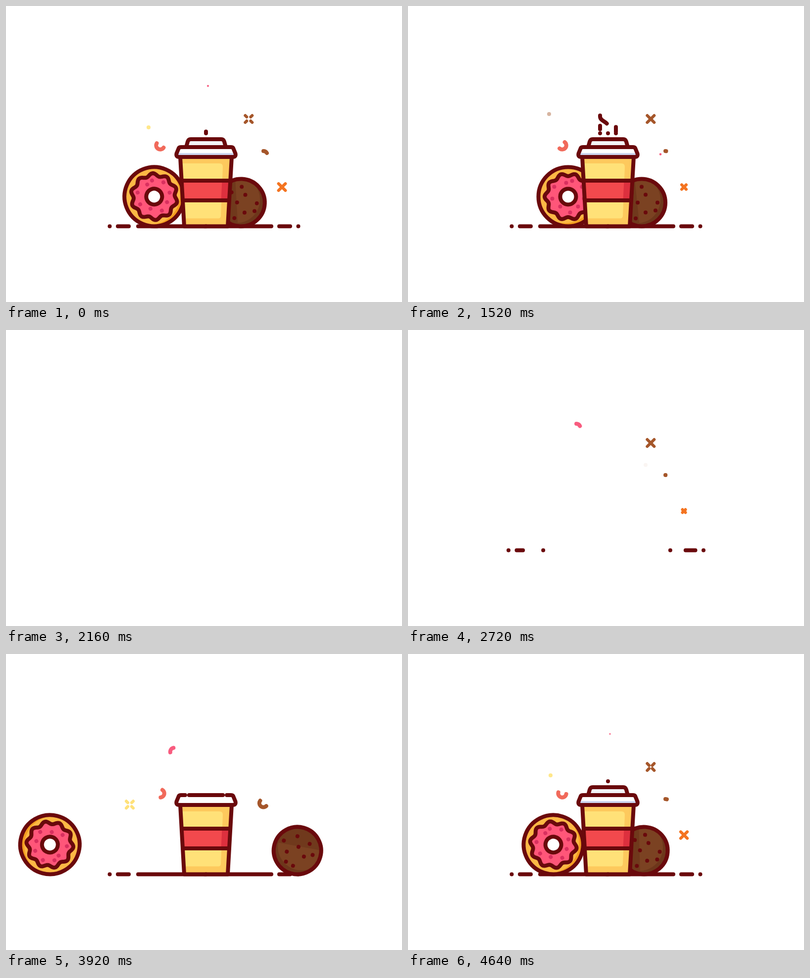
These frames come from a looping animation (800 px wide and 600 px high, 4.68 s). An HTML page with a canvas:

```html
<!DOCTYPE html>
<html lang="en">
<head>
<meta charset="utf-8">
<title>Coffee break</title>
<style>
html, body { margin: 0; width: 100%; height: 100%; overflow: hidden; background: #fff; }
canvas { display: block; width: 800px; height: 600px; }
</style>
</head>
<body>
<canvas id="stage" width="800" height="600"></canvas>
<script>
const LOOP = 4680, RESET = 2300, TAU = Math.PI * 2;
const INK = '#6a090c', BROWN = '#a5562a', CORAL = '#f16a5b', PINK = '#f85c7f',
      ORANGE = '#f47421', YELLOW = '#ffe17a';
const g = document.getElementById('stage').getContext('2d');

const clamp = v => Math.max(0, Math.min(1, v));
const ramp = (t, a, b) => clamp((t - a) / (b - a));
const out = (p, n = 2) => 1 - Math.pow(1 - p, n);
const mix = (a, b, p) => a + (b - a) * p;
const age = (t, start) => (t - start + LOOP) % LOOP;

function stroke(color = INK, width = 8) {
  g.strokeStyle = color;
  g.lineWidth = width;
  g.stroke();
}
function line(x1, y1, x2, y2, color, width) {
  g.beginPath();
  g.moveTo(x1, y1);
  g.lineTo(x2 + 0.01, y2);
  stroke(color, width);
}
function disc(x, y, r, color) {
  g.beginPath();
  g.arc(x, y, r, 0, TAU);
  g.fillStyle = color;
  g.fill();
}
function rect(x, y, w, h, color) {
  g.fillStyle = color;
  g.fillRect(x, y, w, h);
}
// Strokes the part of a path between two lengths.
function trim(path, from, to) {
  if (to < 0) return;
  g.setLineDash([0, from, Math.max(0.01, to - from), 999]);
  g.strokeStyle = INK;
  g.lineWidth = 8;
  g.stroke(path);
  g.setLineDash([]);
}
function clipped(path, draw) {
  g.save();
  g.clip(path);
  draw();
  g.restore();
}
function circlePath(r) {
  const p = new Path2D();
  p.arc(0, 0, r, 0, TAU);
  return p;
}

const donutRim = circlePath(60), cookieRim = circlePath(48);
const icing = new Path2D();
for (let i = 0; i < 180; i++) {
  const a = i / 180 * TAU, r = 44.5 + 3 * Math.cos(10 * a);
  icing.lineTo(r * Math.cos(a), r * Math.sin(a));
}
icing.closePath();

const sprinkles = [[8, -32], [-4, -28], [-28, -20], [-32, 4], [-16, 20], [4, 32], [20, 20], [32, 4], [28, -20]];
const chips = [[0, -32], [8, -16], [-8, 0], [32, 0], [28, 16], [8, 20], [-12, 32], [-20, -20], [-28, 8]];

function rolling(x, y, angle, draw) {
  g.save();
  g.translate(x, y);
  g.rotate(angle);
  draw();
  g.restore();
}

function donut(t) {
  const rest = 1.875e-4 * Math.max(0, 5040 - t) ** 2;
  if (rest > 460) return;
  rolling(323.5, 386.4, 0, () => {
    g.translate(-rest, 0);
    g.rotate(-rest / 64);
    clipped(donutRim, () => {
      disc(0, 0, 60, '#f49d20');
      disc(-6, -6, 60, '#fdb845');
    });
    g.stroke(donutRim);
    g.fillStyle = '#ff5679';
    g.fill(icing);
    for (const [x, y] of sprinkles) disc(x, y, 4, '#d9305f');
    g.stroke(icing);
    disc(0, 0, 16, '#fff');
    stroke();
  });
}

function cookie(t) {
  const rest = 1.444e-4 * Math.max(0, 4820 - t) ** 2;
  if (rest > 400) return;
  rolling(472 + rest, 398.5, rest / 63, () => {
    clipped(cookieRim, () => {
      disc(0, 0, 48, '#6d371b');
      disc(-10, -6, 48, '#7b4222');
      g.save();
      g.rotate(-0.1);
      rect(-60, -60, 51, 120, '#70391c');
      g.restore();
    });
    for (const [x, y] of chips) disc(x, y, 4, INK);
    g.stroke(cookieRim);
  });
}

function ground(t) {
  const p = ramp(t, 2620, 2980), shift = 6.5 * (1 - ramp(t, 2720, 2960));
  const early = 10 * (1 - ramp(t, 2560, 2720));
  if (t < 2560) return;
  const left = -shift - early;
  line(209.5 + left, 446.5, 209.5 + left, 446.5);
  const dash = 22 * ramp(t, 2560, 2840);
  line(226 + left, 446.5, 226 + left + dash, 446.5);
  if (t < 2640) return;
  const dashR = 22 * ramp(t, 2560, 2740);
  line(590.5 + shift, 446.5, 590.5 + shift, 446.5);
  line(574 + shift - dashR, 446.5, 574 + shift, 446.5);
  const reach = 134.5 * out(ramp(t, 2720, 3000));
  const inset = shift * 0.95;
  line(267 + inset, 446.5, Math.max(267 + inset, 267 + reach), 446.5);
  line(Math.min(536 - inset, 536 - reach), 446.5, 536 - inset, 446.5);
}

const body = new Path2D('M352 306H456L448 446H360Z');
const light = new Path2D('M340 319H431Q438 319 438 326L434 426Q433 430.500 429 430.500H340Z');
const wallL = new Path2D('M404 446.500H360L352 306');
const wallR = new Path2D('M404 446.500H448L456 306');
const lid = new Path2D('M354 286H454Q458 286 459 288L463.500 299Q465 306 458 306H350Q343 306 344.500 299L349 288Q350 286 354 286Z');
const lidL = new Path2D('M404 306H350Q343 306 344.500 299L349 288Q350 286 354 286H364');
const lidR = new Path2D('M404 306H458Q465 306 463.500 299L459 288Q458 286 454 286H444');
const cap = new Path2D('M364 286L367 275Q368.500 270 373 270H435Q439.500 270 441 275L444 286Z');

function cup(t) {
  const grow = out(ramp(t, 3020, 3420));
  if (grow <= 0) return;
  const top = mix(446, 306, grow);
  clipped(body, () => {
    g.beginPath();
    g.rect(340, top, 130, 150);
    g.clip();
    rect(340, 300, 130, 150, '#fdc95d');
    g.fillStyle = '#ffe178';
    g.fill(light);
    const band = ramp(t, 3260, 3480);
    if (band > 0) {
      const h = 40 * band;
      rect(340, 394 - h, 130, h, '#f2494d');
      g.beginPath();
      g.moveTo(436.5, 394 - h);
      g.lineTo(470, 394 - h);
      g.lineTo(470, 394);
      g.lineTo(434.5, 394);
      g.fillStyle = '#dd303e';
      g.fill();
    }
  });
  trim(wallL, 0, 184.3 * grow);
  trim(wallR, 0, 184.3 * grow);
  const bars = ramp(t, 3260, 3480);
  if (bars > 0) {
    line(355, 354, mix(355, 453, bars), 354);
    line(357, 394, mix(357, 451, bars), 394);
  }

  const rise = out(ramp(t, 3970, 4240));
  if (rise > 0) {
    g.save();
    g.beginPath();
    g.rect(350, 250, 110, 37);
    g.clip();
    g.translate(0, 16 * (1 - rise));
    g.fillStyle = '#f3f4f8';
    g.fill(cap);
    g.stroke(cap);
    g.restore();
  }

  const rim = ramp(t, 3440, 3935);
  if (rim <= 0) return;
  if (rim > 0.6) {
    g.fillStyle = '#fff';
    g.fill(lid);
    clipped(lid, () => rect(340, 298, 128 * ramp(t, 3940, 4160), 6, '#ccd5ef'));
  }
  const length = 91 * out(rim, 1.3);
  trim(lidL, 0, length);
  trim(lidR, 0, length);
  const half = 40 * ramp(t, 3640, 3970);
  if (half > 0) line(404 - half, 286, 404 + half, 286);
}

// path, length, delay, duration, tail power
const wisps = [
  [new Path2D('M388 258V241'), 17, 50, 1000, 1.8],
  [new Path2D('M404 258V244C404 234 388 234 388 224V211'), 51, 0, 1200, 1.8],
  [new Path2D('M420 258V242'), 16, 210, 920, 3],
  [new Path2D('M404 222V209'), 13, 760, 700, 1.8]
];
function steam(t) {
  for (const start of [4640, 5480, 6320]) {
    for (const [path, length, delay, time, power] of wisps) {
      const p = (t - start - delay) / time;
      if (p >= 0 && p <= 1) trim(path, length * p ** power, length * out(p));
    }
  }
}

// x, y, color, starts
const crosses = [
  [490.3, 229, BROWN, [1170, 2370, 4185]],
  [557.5, 367, ORANGE, [1380, 2636, 4374]],
  [250, 305.3, YELLOW, [430, 3430]]
];
function cross(x, y, color, p) {
  const far = 7 * out(clamp(p * 2)), near = Math.min(far, 7 * Math.max(0, (p - 0.42) / 0.5));
  const width = 6 * clamp((1 - p) / 0.12);
  for (const sx of [-1, 1]) for (const sy of [-1, 1]) {
    line(x + sx * near, y + sy * near, x + sx * far, y + sy * far, color, width);
  }
}

// x, y, color, start, duration, turn in degrees
const curls = [
  [311.6, 282.5, CORAL, 1130, 830, 360],
  [311.6, 282.5, CORAL, 3120, 1000, -360],
  [311.6, 282.5, CORAL, 4100, 830, 360],
  [520, 302.3, BROWN, 4620, 830, 540],
  [520, 302.3, BROWN, 1505, 830, 360],
  [520, 302.3, BROWN, 2715, 1670, 360],
  [340, 198.3, PINK, 2535, 1540, 360]
];
function curl(x, y, color, p, turn) {
  const angle = v => -Math.PI / 2 + turn * v * Math.PI / 180;
  const head = Math.max(p ** 3 + 0.001, out(p, 1.5));
  g.beginPath();
  g.arc(x, y, 8.2, angle(p ** 3), angle(head), turn < 0);
  stroke(color);
}

// x, y, color, start
const dots = [
  [408, 162, PINK, 4480], [288, 246, '#ffe78a', 4180], [434, 220, '#e58a32', 320],
  [285, 219, BROWN, 740], [510, 300.5, PINK, 1290], [480, 273.5, BROWN, 1750],
  [311.6, 274.2, CORAL, 90]
];

function confetti(t) {
  for (const [x, y, color, starts] of crosses) {
    for (const s of starts) {
      const p = age(t, s) / 700;
      if (p < 1) cross(x, y, color, p);
    }
  }
  for (const [x, y, color, s, time, turn] of curls) {
    const p = age(t, s) / time;
    if (p < 1) curl(x, y, color, p, turn);
  }
  for (const [x, y, color, s] of dots) {
    const a = age(t, s);
    if (a >= 1000) continue;
    g.globalAlpha = clamp((1000 - a) / 500);
    disc(x, y, 4 * clamp(a / 400), color);
    g.globalAlpha = 1;
  }
}

function draw(t) {
  // The scene is built late in the loop and leaves early in the next one.
  const scene = t < RESET ? t + LOOP : t;
  const leave = t < RESET ? 181 * (Math.max(0, t - 1600) / 320) ** 3 : 0;
  rect(0, 0, 800, 600, '#fff');
  g.save();
  g.translate(-leave, 0);
  g.lineCap = g.lineJoin = 'round';
  g.strokeStyle = INK;
  g.lineWidth = 8;
  ground(scene);
  g.strokeStyle = INK;
  g.lineWidth = 8;
  donut(scene);
  g.strokeStyle = INK;
  g.lineWidth = 8;
  cookie(scene);
  cup(scene);
  steam(scene);
  confetti(t);
  g.restore();
}

const begin = performance.now();
function tick() {
  draw((performance.now() - begin) % LOOP);
  requestAnimationFrame(tick);
}
tick();
</script>
</body>
</html>
```
